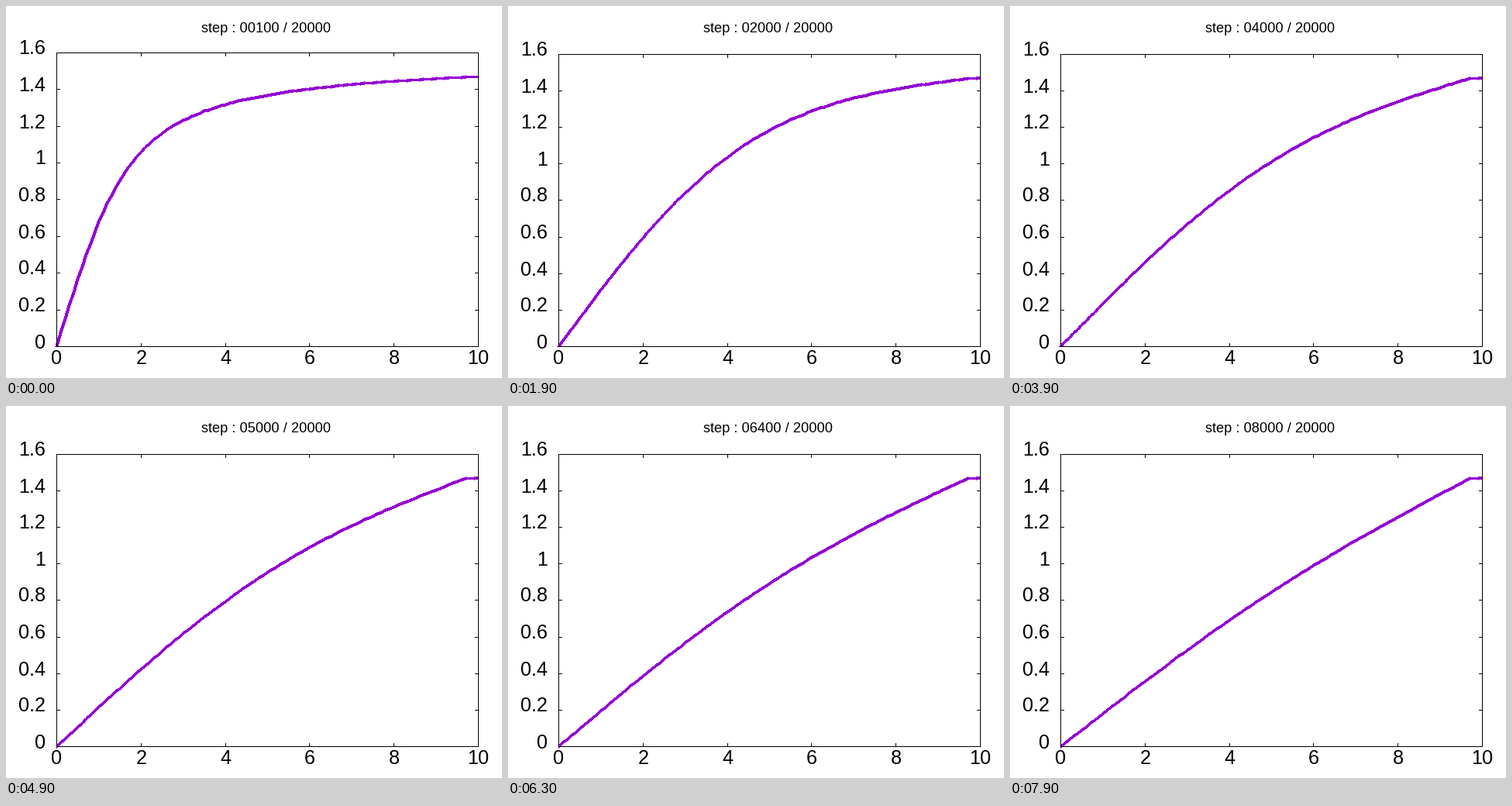
These frames come from a looping animation (640 by 480 pixels, 8000 ms). A matplotlib script:

```python
import matplotlib.pyplot as plt
import numpy as np
from matplotlib.animation import FuncAnimation
from matplotlib.collections import LineCollection, PolyCollection

W, H, DPI = 640, 480, 80
PX = 72 / DPI  # one pixel in points
LEFT, RIGHT, BOTTOM = 65, 609, 439
FRAMES, STEPS_PER_FRAME = 80, 100
TICK = 5
CURVE_WIDTH = 3

plt.rcParams["font.family"] = "Liberation Sans"


def diffuse():
    """Explicit heat equation from atan(x); the ends keep their values."""
    u = np.arctan(x)
    history = []
    for _ in range(FRAMES):
        for _ in range(STEPS_PER_FRAME):
            u[1:97] += 0.25 * (u[2:98] - 2 * u[1:97] + u[:96])
        history.append(u.copy())
    return history


def to_px(v):
    return LEFT + np.floor(np.asarray(v) / 10 * (RIGHT - LEFT) + 0.5)


def to_py(v, top):
    return BOTTOM - np.floor(np.asarray(v) / 1.6 * (BOTTOM - top) + 0.5)


def frame_lines(top):
    """Border and inward ticks on all four sides."""
    lines = [[(LEFT, BOTTOM), (RIGHT, BOTTOM), (RIGHT, top),
              (LEFT, top), (LEFT, BOTTOM)]]
    for px in to_px(xticks):
        lines += [[(px, BOTTOM), (px, BOTTOM - TICK + 1)],
                  [(px, top), (px, top + TICK - 1)]]
    for py in to_py(yticks, top):
        lines += [[(LEFT, py), (LEFT + TICK - 1, py)],
                  [(RIGHT, py), (RIGHT - TICK + 1, py)]]
    return lines


def thick_segments(px, py):
    """Bands of constant width, measured across each segment's main axis."""
    pts = np.column_stack([px, py])
    d = np.diff(pts, axis=0)
    reach = 0.5 * d / np.abs(d).max(axis=1, keepdims=True)
    a, b = pts[:-1] - reach, pts[1:] + reach
    steep = np.abs(d[:, 1]) > np.abs(d[:, 0])
    side = CURVE_WIDTH / 2 * np.column_stack([steep, ~steep])
    return np.stack([a - side, b - side, b + side, a + side], axis=1)


def label(px, py, s, size, ha):
    return ax.text(px, py, s, fontsize=size * PX, ha=ha, va="baseline",
                   color="black")


x = np.linspace(0, 10, 101)
xticks = np.arange(0, 11, 2)
yticks = np.arange(9) * 0.2
states = diffuse()

fig = plt.figure(figsize=(W / DPI, H / DPI), dpi=DPI, facecolor="white")
ax = fig.add_axes([0, 0, 1, 1])
ax.set_xlim(-0.5, W - 0.5)
ax.set_ylim(H - 0.5, -0.5)
ax.axis("off")

curve = PolyCollection([], facecolors="#9400d3", edgecolors="none",
                       antialiaseds=False, zorder=2)
box = LineCollection([], colors="black", linewidths=PX, antialiaseds=False,
                     capstyle="projecting", zorder=3)
for part in (curve, box):
    part.set_snap(False)
    ax.add_collection(part, autolim=False)

title = label(335.5, 34, "", 18.3, "center")
for v, px in zip(xticks, to_px(xticks)):
    label(px, 462, f"{v}", 25.3, "center")
ylabels = [label(50.5, 0, f"{v:g}", 25.3, "right") for v in yticks]


def draw(n):
    top = 60 if n == 0 else 62
    title.set_text(f"step : {(n + 1) * STEPS_PER_FRAME:05d} / 20000")
    curve.set_verts(thick_segments(to_px(x), to_py(states[n], top)))
    box.set_segments(frame_lines(top))
    for text, py in zip(ylabels, to_py(yticks, top)):
        text.set_y(py + 2)
    return [curve, box, title, *ylabels]


anim = FuncAnimation(fig, draw, frames=FRAMES, interval=100, repeat=True,
                     repeat_delay=0, blit=False)
plt.show()
```
